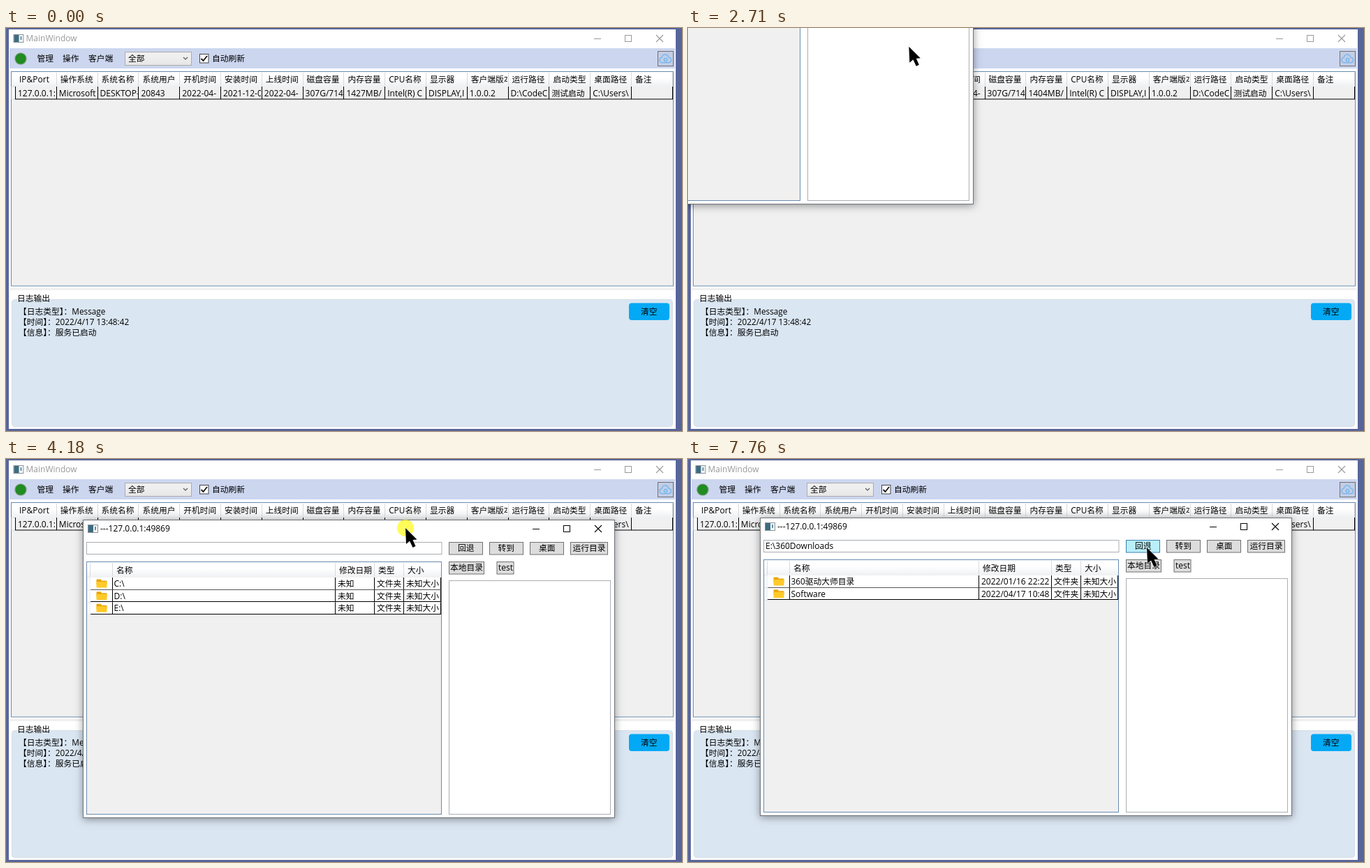
Write an HTML page with a canvas that moves like this. It is 968x578 px and loops after 7.99 s.

```html
<!DOCTYPE html>
<html lang="zh">
<head>
<meta charset="utf-8">
<title>MainWindow</title>
<style>
html, body { margin: 0; width: 100%; height: 100%; overflow: hidden; background: #58659a; }
canvas { display: block; }
</style>
</head>
<body>
<canvas id="stage" width="968" height="578"></canvas>
<script>
const c = document.getElementById('stage').getContext('2d');
const LOOP = 7990;
const FONT = '"Open Sans", "Noto Sans CJK SC", "Noto Sans CJK", sans-serif';
const BLUE = '#0078d7', ROW = 17.67;

const drives = ['C:\\', 'D:\\', 'E:\\'].map(n => [n, '未知']);
const driveE = `$RECYCLE.BIN|2022/03/13 18:52
020cec4604af5efe911fbf654601dbe0|2022/04/06 23:09
16ec8e2ea52dc837a071a88ebfe07594|2022/04/09 14:43
360Downloads|2022/04/17 13:58
360RecycleBin|2022/03/06 16:24
360SoftMgrGame|2022/02/10 20:57
BaiduNetdiskDownload|2022/01/16 22:02
BaiduNetdiskWorkspace|2021/08/07 00:51
CloudMusic|2021/07/18 16:19
FileHistory|2021/06/27 17:23
iGame|2022/04/06 23:13
Program Files|2022/03/20 22:26
ProgramFilesFolder|2021/11/13 00:08
QLDownloadGame|2022/02/14 22:46
QQMusicCache|2022/04/17 10:08
qycache|2022/03/13 19:24
SteamLibrary|2022/04/06 23:07
System Volume Information|2022/04/07 19:52
Test|2021/11/27 21:03
|`.split('\n').map(l => l.split('|'));
const downloads = [['360驱动大师目录', '2022/01/16 22:22'], ['Software', '2022/04/17 10:48']];

// Folder views: column edges are relative to the dialog
const views = [
  { from: 0, path: '', rows: drives, cols: [11, 43, 362, 418, 460, 513] },
  { from: 5360, path: '', rows: drives, cols: [11, 43, 362, 418, 460, 513], sel: 2 },
  { from: 5480, path: 'E:\\', rows: driveE, cols: [11, 43, 297, 402, 443.5, 497], scroll: true },
  { from: 6910, path: 'E:\\', rows: driveE, cols: [11, 43, 297, 402, 443.5, 497], scroll: true, sel: 3 },
  { from: 7050, path: 'E:\\360Downloads', rows: downloads, cols: [11, 43, 314, 418, 460, 513] }
];

const heads = ['IP&Port', '操作系统', '系统名称', '系统用户', '开机时间', '安装时间', '上线时间', '磁盘容量',
  '内存容量', 'CPU名称', '显示器', '客户端版本', '运行路径', '启动类型', '桌面路径', '备注'];
const cells = ['127.0.0.1:4', 'Microsoft W', 'DESKTOP-', '20843', '2022-04-', '2021-12-0', '2022-04-', '307G/714',
  '1427MB/', 'Intel(R) C', 'DISPLAY,I', '1.0.0.2', 'D:\\CodeC', '测试启动', 'C:\\Users\\', ''];

// Motion keys: [time, x, y]
const dialogKeys = [[3630, -353, -175], [4160, 110, 87], [4200, 110, 87], [4340, 103, 84]];
const cursorKeys = [[290, 682, 509], [760, 296, 95], [840, 316, 92], [1780, 316, 92], [2160, 402, 105],
  [2550, 402, 105], [3000, 109, -163]];
const laterKeys = [[4600, 565, 96], [4920, 146, 204], [5040, 235, 213], [6060, 235, 213], [6230, 226, 201],
  [6430, 242, 214], [6750, 236, 229], [7360, 236, 229], [7760, 657, 127]];
const presses = [[1220, 1390], [2310, 2400], [3560, 4490], [5360, 6060], [6910, 7360]];

function follow(keys, t) {
  let i = keys.findIndex(k => k[0] > t);
  if (i < 0) i = keys.length;
  const a = keys[Math.max(i - 1, 0)], b = keys[Math.min(i, keys.length - 1)];
  let p = a === b ? 0 : (t - a[0]) / (b[0] - a[0]);
  p = p * p * (3 - 2 * p);
  return [a[1] + (b[1] - a[1]) * p, a[2] + (b[2] - a[2]) * p];
}

function rect(x, y, w, h, fill, stroke, width = 1) {
  if (fill) { c.fillStyle = fill; c.fillRect(x, y, w, h); }
  if (stroke) { c.strokeStyle = stroke; c.lineWidth = width; c.strokeRect(x, y, w, h); }
}

function round(x, y, w, h, r, fill, stroke) {
  c.beginPath();
  c.roundRect(x, y, w, h, r);
  if (fill) { c.fillStyle = fill; c.fill(); }
  if (stroke) { c.strokeStyle = stroke; c.lineWidth = 1; c.stroke(); }
}

function disc(x, y, r, fill) {
  c.beginPath();
  c.arc(x, y, r, 0, 7);
  c.fillStyle = fill;
  c.fill();
}

function line(color, width, ...p) {
  c.strokeStyle = color;
  c.lineWidth = width;
  c.beginPath();
  for (let i = 0; i < p.length; i += 2) c.lineTo(p[i], p[i + 1]);
  c.stroke();
}

// Text is placed by its left edge and vertical middle
function text(s, x, y, color = '#000', room = 0) {
  c.save();
  if (room) {
    c.beginPath();
    c.rect(x - 1, y - 10, room, 20);
    c.clip();
  }
  c.font = (/[^\x00-\xff]/.test(s) ? 11.75 : 12) + 'px ' + FONT;
  c.fillStyle = color;
  c.fillText(s, x, y + 4.3);
  c.restore();
}

function shade(y, h, top, bottom) {
  const g = c.createLinearGradient(0, y, 0, y + h);
  g.addColorStop(0, top);
  g.addColorStop(.4, top);
  g.addColorStop(1, bottom);
  return g;
}

function titleBar(x, y, title, color, right) {
  rect(x + .5, y - 5.5, 14, 11, '#f4f7f9', '#8b929b');
  rect(x + 1, y - 5, 7, 10, '#3c6c80');
  rect(x + 10, y - 3, 2, 5, '#6a8fa0');
  text(title, x + 18, y, color);
  line(color, 1, right - 94, y + .5, right - 84, y + .5);
  rect(right - 49.5, y - 4.5, 9, 9, null, color);
  line(color, 1.1, right - 5, y - 5, right + 5, y + 5);
  line(color, 1.1, right + 5, y - 5, right - 5, y + 5);
}

function toolbar() {
  rect(5, 29, 953, 29, '#ccd6ef');
  disc(21, 44, 8.8, '#93a89d');
  disc(21, 44, 7.7, '#228b22');
  text('管理', 44.5, 44);
  text('操作', 81, 44);
  text('客户端', 118, 44);
  rect(170.5, 34.5, 95, 19, shade(34, 20, '#efefef', '#e5e5e5'), '#acacac');
  text('全部', 175, 44);
  line('#555', 1.1, 254, 42, 257, 45, 260, 42);
  rect(277.5, 37.5, 12.5, 12.5, '#fff', '#444');
  line('#111', 1.8, 279.5, 44, 282.5, 47, 288, 40);
  text('自动刷新', 295, 44);
  rect(933.5, 33.5, 22, 21, '#c3cde5', '#707070');
  c.strokeStyle = '#6cb6f5';
  c.lineWidth = 1.3;
  c.beginPath();
  c.arc(939.5, 46, 3.6, 1.57, 4.5);
  c.arc(944, 42.5, 4.6, 3.4, 6);
  c.arc(949, 46, 3.6, 4.9, 7.85);
  c.closePath();
  c.stroke();
  c.beginPath();
  c.arc(944.5, 45.5, 2.2, 0, 7);
  c.stroke();
}

function clientTable(t) {
  const picked = t >= 1220 && t < 1390;
  rect(7.5, 62.5, 948, 307.5, '#f0f0f0', '#688caf');
  rect(8, 63, 947, 21, shade(63, 21, '#fff', '#eff0f2'));
  rect(8, 84, 6, 18, '#f7f8f9', '#d4dbe2');
  if (picked) rect(14, 84, 941, 18, BLUE);
  heads.forEach((h, i) => {
    const x = 14 + 58.8 * i, edge = Math.round(x + 58.8) - .5;
    text(h, x + 5, 74, '#000', 53);
    line('#d9dadc', 1, edge, 64, edge, 83);
    const value = i === 8 && t >= 2470 ? '1404MB/' : cells[i];
    text(value, x + 3, 93.5, picked ? '#fff' : '#000', 55);
    line('#000', 1, edge, 84, edge, 102);
  });
  line('#000', 1, 13.5, 84, 13.5, 102);
  line('#000', 1.2, 13, 102, 955, 102);
}

function logPanel() {
  rect(5, 373, 953, 3, '#f0f0f0');
  round(8.5, 389.5, 946, 182, 4, '#dae6f2', '#d5dfe5');
  text('日志输出', 16, 388);
  text('【日志类型】：Message', 18, 407);
  text('【时间】：2022/4/17 13:48:42', 18, 421.5);
  text('【信息】：服务已启动', 18, 436.5);
  round(892, 394.5, 58, 24.5, 4, '#03a9f4');
  text('清空', 909, 407);
}

function mainWindow(t) {
  const active = t >= 1220 && t < 2470;
  rect(0, 0, 968, 578, '#58659a');
  rect(4, 2, 955, 573, '#fff');
  titleBar(10.5, 15, 'MainWindow', active ? '#000' : '#999', 936);
  toolbar();
  clientTable(t);
  logPanel();
}

function menu(t, [cx, cy]) {
  c.save();
  c.globalAlpha = Math.min(1, .35 + (t - 1390) / 240);
  rect(321, 98, 146, 199, 'rgba(0,0,0,.22)');
  rect(320, 97, 145.5, 198.5, 'rgba(0,0,0,.35)');
  rect(316.5, 93.5, 147, 200, '#f5f5f5', '#959595');
  rect(318, 95, 28, 197, '#f1f1f1');
  line('#dcdcdc', 1, 346.5, 95, 346.5, 292);
  if (cx > 319 && cy > 95) rect(319.5, 95.5, 140, 21, '#c1e1ef', '#26a0da');
  ['文件管理器', '文件分发', '屏幕操作', '进程管理', '远程终端', '注册表管理', '设置备注', '客户端更新', '分组管理']
    .forEach((s, i) => text(s, 353, 106.3 + 21.25 * i + (i > 5 ? 5 : 0)));
  line('#d0d0d0', 1, 349, 225.5, 460, 225.5);
  c.restore();
}

function folder(x, y) {
  c.fillStyle = '#e9a50c';
  c.beginPath();
  c.roundRect(x, y, 7, 5, 1);
  c.roundRect(x, y + 2, 15, 6, 1);
  c.fill();
  round(x, y + 3.5, 15, 8.5, 1, '#ffca28');
}

function fileList({ rows, cols, sel, scroll }) {
  rect(5.5, 60.5, 508, 362, '#f0f0f0', '#688caf');
  c.save();
  c.beginPath();
  c.rect(6, 61, 507.5, 361);
  c.clip();
  rect(6, 61, cols[5] - 6, 22, shade(61, 22, '#fff', '#eff0f2'));
  ['', '名称', '修改日期', '类型', '大小'].forEach((h, i) => {
    text(h, cols[i] + 5, 72.5);
    line('#d9dadc', 1, cols[i] - .5, 62, cols[i] - .5, 82);
  });
  rows.forEach(([name, date], i) => {
    const y = 83 + ROW * i, mid = y + 8.6, bottom = Math.round(y + ROW) - .5;
    const on = i === sel, ink = on ? '#fff' : '#000';
    rect(6, y, 5, ROW, '#f7f8f9', '#d9e0e6', .6);
    rect(11, y, cols[5] - 11, ROW, on ? BLUE : '#fff');
    folder(19.5, y + 2.5);
    if (name) [name, date, '文件夹', '未知大小'].forEach((s, k) => text(s, cols[k + 1] + (k ? 3 : 1.5), mid, ink));
    cols.slice(1).forEach(x => line('#000', 1, x - .5, y, x - .5, bottom));
    line('#000', 1.1, 11, bottom, cols[5], bottom);
    if (on) rect(cols[1], y + .5, cols[2] - cols[1] - 1, ROW - 1.5, null, '#000', 2);
  });
  if (scroll) {
    rect(498, 83, 15.5, 340, '#f0f0f0');
    rect(498, 100, 15, 193, '#cdcdcd');
    line('#606060', 1.2, 502, 93.5, 505.5, 90, 509, 93.5);
    line('#606060', 1.2, 502, 412.5, 505.5, 416, 509, 412.5);
  }
  c.restore();
}

function button(s, x, y, w, tx, hot) {
  rect(x + .5, y + .5, w, 17.5, hot ? '#b9eff9' : '#ddd', hot ? '#3c7fb1' : '#707070');
  text(s, tx, y + 9);
}

function dialog(t, [x, y], [cx, cy]) {
  const view = views.findLast(v => t >= v.from);
  c.save();
  c.translate(x, y);
  c.shadowColor = 'rgba(0,0,0,.4)';
  c.shadowBlur = 11;
  c.shadowOffsetY = 2;
  rect(0, 0, 762, 428, '#fff');
  c.shadowColor = 'transparent';
  rect(.5, .5, 761, 427, null, '#6d7278');
  titleBar(7, 13, '---127.0.0.1:49869', '#000', 738);
  rect(5.5, 32.5, 508.5, 17, '#fff', '#abadb3');
  text(view.path, 8, 40.5);
  button('回退', 524, 32, 48, 537, t > 7360 && cx > 627 && cy < 134);
  button('转到', 582, 32, 48, 594.5);
  button('桌面', 640, 32, 48, 653);
  button('运行目录', 698, 32, 53, 701.5);
  button('本地目录', 524, 60, 50, 526);
  button('test', 592.5, 60, 24, 595);
  fileList(view);
  rect(524.5, 87.5, 231, 335, '#fff', '#abadb3');
  c.restore();
}

function cursor(t, [x, y]) {
  if (presses.some(([a, b]) => t >= a && t < b)) disc(x, y, 12, 'rgba(255,250,0,.65)');
  c.save();
  c.translate(x, y);
  c.beginPath();
  [[0, 0], [1, 23], [6, 18.5], [10.5, 28], [14.5, 26], [10.5, 17], [16.5, 16.5]].forEach(p => c.lineTo(...p));
  c.closePath();
  c.strokeStyle = '#fff';
  c.lineWidth = 1.2;
  c.stroke();
  c.fillStyle = '#000';
  c.fill();
  c.restore();
}

function draw(now) {
  const t = now % LOOP;
  const pos = follow(dialogKeys, t);
  let tip = follow(t < 3100 ? cursorKeys : laterKeys, t);
  if (t >= 3100 && t < 4600) tip = [pos[0] + 462, pos[1] + 12]; // dragging by the title bar
  mainWindow(t);
  if (t >= 1390 && t < 2390) menu(t, tip);
  if (t >= 2470) dialog(t, pos, tip);
  if (t >= 290) cursor(t, tip);
}

const start = performance.now();
function tick() {
  draw(performance.now() - start);
  requestAnimationFrame(tick);
}
tick();
</script>
</body>
</html>
```
